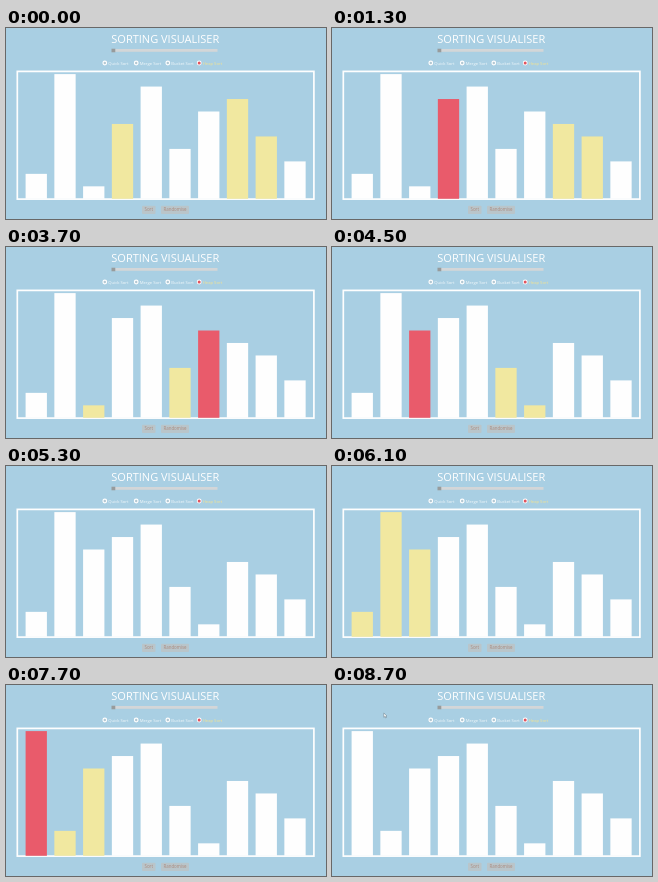
These frames come from a looping animation (320 by 191 pixels, 8.8 s). An HTML page with a canvas:

```html
<!DOCTYPE html>
<html lang="en">
<head>
<meta charset="utf-8">
<title>Sorting Visualiser</title>
<style>
html, body { margin: 0; width: 100%; height: 100%; overflow: hidden; background: #a9cfe3; }
canvas { display: block; width: 320px; height: 191px; }
</style>
</head>
<body>
<canvas id="stage"></canvas>
<script>
const LOOP = 8800;
const WHITE = '#fefefe', YELLOW = '#f1e8a0', RED = '#e95b6b';
const FONT = '"Open Sans", "Noto Sans", sans-serif';
const START = [2, 10, 1, 6, 9, 4, 7, 8, 5, 3];

// Each heapify pass: mark the family, mark the largest, swap, clear.
const PASSES = [
  { family: [3, 7, 8], top: 7, mark: 0, pick: 500, swap: 1300, clear: 2000 },
  { family: [2, 5, 6], top: 6, mark: 2900, pick: 3700, swap: 4500, clear: 5300 },
  { family: [0, 1, 2], top: 1, mark: 6100, pick: 6900, swap: 7700, clear: 8500 }
];

const canvas = document.getElementById('stage');
const ctx = canvas.getContext('2d');
const ratio = window.devicePixelRatio || 1;
canvas.width = Math.round(320 * ratio);
canvas.height = Math.round(191 * ratio);

function box(x, y, w, h, color) {
  ctx.fillStyle = color;
  ctx.fillRect(x, y, w, h);
}

function text(str, x, y, size, color, weight = 400) {
  ctx.font = `${weight} ${size}px ${FONT}`;
  ctx.fillStyle = color;
  ctx.fillText(str, x, y);
}

function dot(x, y, r, color) {
  ctx.beginPath();
  ctx.arc(x, y, r, 0, Math.PI * 2);
  ctx.fillStyle = color;
  ctx.fill();
}

function radio(x, label, on) {
  dot(x, 35, 2.4, WHITE);
  dot(x, 35, on ? 1.5 : 1.2, on ? '#e2545f' : '#b3c8d3');
  text(label, x + 3.5, 36.5, 4.2, on ? '#f3e391' : '#f4f9fb');
}

function button(x, w, label) {
  ctx.beginPath();
  ctx.roundRect(x, 177.8, w, 8.2, 1);
  ctx.fillStyle = '#b9c5ca';
  ctx.fill();
  ctx.textAlign = 'center';
  text(label, x + w / 2, 183.4, 4.4, '#ab897c');
  ctx.textAlign = 'left';
}

function cursor(x, y) {
  ctx.beginPath();
  ctx.moveTo(x, y);
  ctx.lineTo(x, y + 4.4);
  ctx.lineTo(x + 1.1, y + 3.5);
  ctx.lineTo(x + 1.9, y + 5);
  ctx.lineTo(x + 2.6, y + 4.6);
  ctx.lineTo(x + 1.9, y + 3.1);
  ctx.lineTo(x + 3.1, y + 3);
  ctx.closePath();
  ctx.fillStyle = WHITE;
  ctx.fill();
  ctx.strokeStyle = '#60747e';
  ctx.lineWidth = 0.5;
  ctx.stroke();
}

function stateAt(t) {
  const values = START.slice();
  const colors = values.map(() => WHITE);
  for (const p of PASSES) {
    const root = p.family[0];
    const swapped = t >= p.swap;
    if (swapped) [values[root], values[p.top]] = [values[p.top], values[root]];
    if (t >= p.mark && t < p.clear) {
      p.family.forEach(i => { colors[i] = YELLOW; });
      if (t >= p.pick) colors[swapped ? root : p.top] = RED;
    }
  }
  return { values, colors };
}

function draw(t) {
  ctx.setTransform(ratio, 0, 0, ratio, 0, 0);
  box(0, 0, 320, 191, '#a9cfe3');

  text('SORTING VISUALISER', 105.3, 15, 11, WHITE, 500);
  box(106, 21, 105.5, 2.8, '#d3d6d8');
  box(105.5, 20.7, 3.8, 3.6, '#979b9c');

  radio(98.8, 'Quick Sort');
  radio(130.2, 'Merge Sort');
  radio(161.8, 'Bucket Sort');
  radio(193.2, 'Heap Sort', true);

  ctx.strokeStyle = WHITE;
  ctx.lineWidth = 1.7;
  ctx.strokeRect(11.3, 43.4, 296.6, 127.7);

  const { values, colors } = stateAt(t);
  values.forEach((v, i) => {
    const h = v * 12.47;
    box(19.6 + i * 28.75, 170.8 - h, 21.3, h, colors[i]);
  });

  button(136, 13.5, 'Sort');
  button(155, 28, 'Randomise');

  if (t >= 8600) cursor(51.8, 28);
}

const begin = performance.now();
function tick() {
  draw((performance.now() - begin) % LOOP);
  requestAnimationFrame(tick);
}
tick();
</script>
</body>
</html>
```
